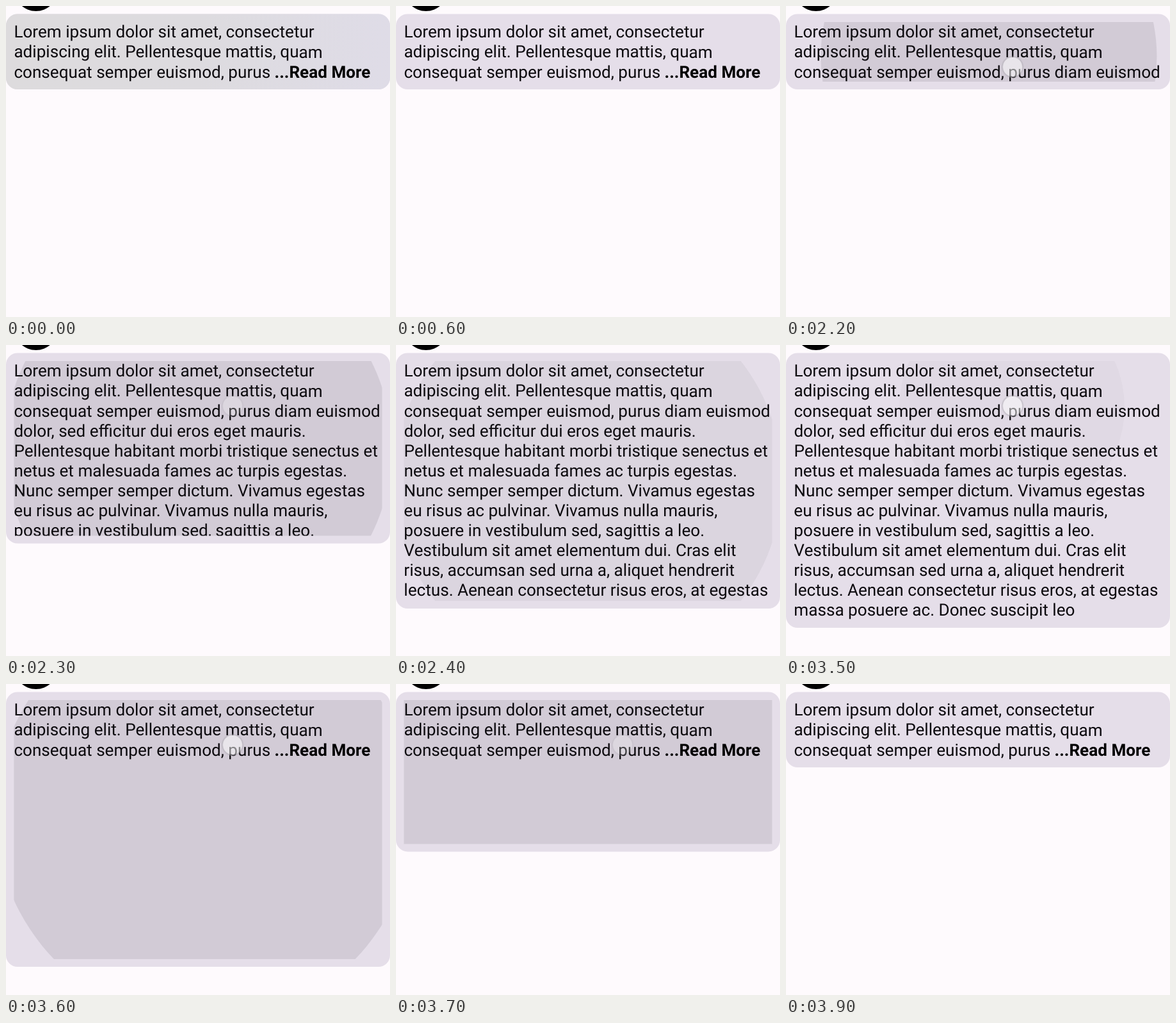
These frames come from a looping animation (600 by 485 pixels, 4.9 s). An HTML page:

```html
<!DOCTYPE html>
<html lang="en">
<head>
<meta charset="utf-8">
<title>Read more card</title>
<style>
  html, body { margin: 0; width: 100%; height: 100%; overflow: hidden; background: #fefafd; }
  svg { display: block; width: 600px; height: 485px; }
  text { font: 400 26.12px Roboto, sans-serif; fill: #0c0a0e; text-rendering: geometricPrecision; white-space: pre; }
  .more { font-weight: 700; fill: #000; }
</style>
</head>
<body>
<svg viewBox="0 0 600 485">
  <defs>
    <clipPath id="inner"><rect id="clip" x="12.4" y="25" width="575.2" height="93"/></clipPath>
    <linearGradient id="haze">
      <stop offset="0" stop-color="#dddbdd"/>
      <stop offset=".5" stop-color="#dddbdf"/>
      <stop offset="1" stop-color="#dfdce7"/>
    </linearGradient>
    <radialGradient id="glow">
      <stop offset=".8" stop-color="#fff" stop-opacity=".5"/>
      <stop offset=".88" stop-color="#aaa6ae" stop-opacity=".5"/>
      <stop offset="1" stop-color="#aaa6ae" stop-opacity="0"/>
    </radialGradient>
  </defs>
  <circle cx="46.8" cy="-26.2" r="34.2"/>
  <rect id="card" y="12.5" width="600" height="117.5" rx="18" fill="#e5dee9"/>
  <rect id="soft" y="12.5" width="600" height="117.5" rx="18" fill="url(#haze)"/>
  <g clip-path="url(#inner)">
    <circle id="ripple" fill="#1d1b20"/>
    <!-- the tiny turn keeps baselines from snapping to whole pixels -->
    <g id="copy" transform="rotate(.004)"></g>
  </g>
  <circle id="touch" cx="354" cy="95" r="18" fill="url(#glow)"/>
</svg>
<script>
const LOOP = 4900, TICK = 100;
const TOP = 25, PAD = 12, LEFT = 12.4, WIDTH = 575.2, LINE = 31.08;
const CLOSED = 118, OPEN = 429;
const TAP = { x: 354, y: 95 };
const TAPS = [
  { down: 2101, toggle: 2200, from: CLOSED, to: OPEN },
  { down: 3481, toggle: 3600, from: OPEN, to: CLOSED }
];
const LINES = [
  'Lorem ipsum dolor sit amet, consectetur',
  'adipiscing elit. Pellentesque mattis, quam',
  'consequat semper euismod, purus ',
  'dolor, sed efficitur dui eros eget mauris.',
  'Pellentesque habitant morbi tristique senectus et',
  'netus et malesuada fames ac turpis egestas.',
  'Nunc semper semper dictum. Vivamus egestas',
  'eu risus ac pulvinar. Vivamus nulla mauris,',
  'posuere in vestibulum sed, sagittis a leo.',
  'Vestibulum sit amet elementum dui. Cras elit',
  'risus, accumsan sed urna a, aliquet hendrerit',
  'lectus. Aenean consectetur risus eros, at egestas',
  'massa posuere ac. Donec suscipit leo'
];

const $ = id => document.getElementById(id);
const set = (el, attrs) => { for (const k in attrs) el.setAttribute(k, attrs[k]); };
const svgEl = (tag, parent, attrs, text = '') => {
  const el = document.createElementNS('http://www.w3.org/2000/svg', tag);
  set(el, attrs);
  el.textContent = text;
  return parent.appendChild(el);
};
const mix = (a, b, p) => a + (b - a) * p;
const clamp = v => Math.max(0, Math.min(1, v));

const rows = LINES.map((s, i) => svgEl('text', $('copy'), { x: LEFT, y: 49.4 + i * LINE }, s));
const more = svgEl('tspan', rows[2], { class: 'more' }, '...Read More');
const rest = svgEl('tspan', rows[2], {}, 'diam euismod');

// cubic-bezier(.4, 0, .2, 1)
function ease(x) {
  if (x >= 1) return 1;
  let lo = 0, hi = 1, s = 0.5;
  for (let i = 0; i < 20; i++) {
    s = (lo + hi) / 2;
    const bx = 1.2 * (1 - s) ** 2 * s + 0.6 * (1 - s) * s * s + s ** 3;
    if (bx < x) lo = s; else hi = s;
  }
  return s * s * (3 - 2 * s);
}

// critically damped spring, settled after 290 ms
function spring(ms) {
  if (ms <= 0) return 0;
  if (ms > 290) return 1;
  const k = ms / 50;
  return 1 - (1 + k) * Math.exp(-k);
}

function draw(time) {
  const t = Math.floor(time / TICK) * TICK;
  let bottom = CLOSED, tap = null;
  for (const p of TAPS) {
    if (t < p.down) break;
    tap = p;
    bottom = mix(p.from, p.to, spring(t - p.toggle - 3));
  }
  const open = t >= TAPS[0].toggle && t < TAPS[1].toggle;

  set($('card'), { height: bottom + PAD - 12.5 });
  set($('clip'), { height: bottom - TOP });
  set($('soft'), { opacity: [1, 0.5, 0.25][t / TICK] || 0 });
  rows.forEach((r, i) => { if (i > 2) r.style.display = open ? '' : 'none'; });
  more.style.display = open ? 'none' : '';
  rest.style.display = open ? '' : 'none';

  const age = tap ? t - tap.down : 1e4;
  const p = ease(age / 225);
  const span = tap ? tap.from - TOP : 0;
  set($('ripple'), {
    cx: mix(TAP.x, LEFT + WIDTH / 2, p),
    cy: mix(TAP.y, (TOP + bottom) / 2, p),
    r: mix(WIDTH * 0.3, Math.hypot(WIDTH, span) / 2 + 12, p),
    opacity: 0.095 * clamp(age / 75) * clamp(1 - (age - 225) / 150)
  });
  set($('touch'), { opacity: age < 150 ? 1 : age < 250 ? 0.45 : 0 });
}

const start = performance.now();
function frame() {
  draw((performance.now() - start) % LOOP);
  requestAnimationFrame(frame);
}
frame();
</script>
</body>
</html>
```
